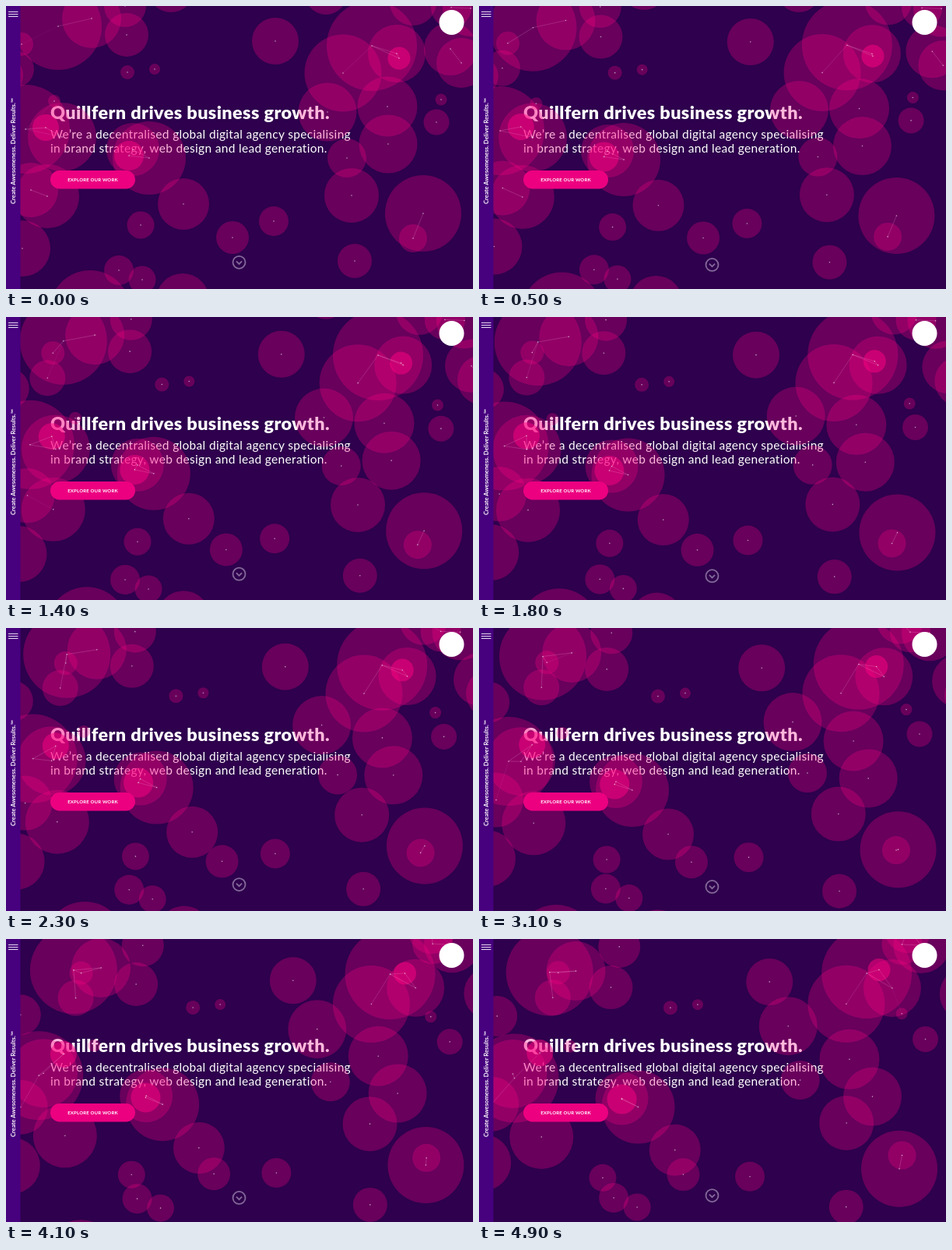
An HTML page for the animation above (5000 ms loop, 600 by 363 pixels).

```html
<!DOCTYPE html>
<html lang="en">
<head>
<meta charset="utf-8">
<title>Landing page</title>
<style>
  html, body { margin: 0; width: 100%; height: 100%; overflow: hidden; background: #2e004d; }
  svg { display: block; width: 600px; height: 363px; font-family: Lato, "Open Sans", sans-serif; fill: #fff; }
  .title { font-size: 23.4px; font-weight: 900; letter-spacing: .4px; }
  .intro { font-size: 15.5px; letter-spacing: .32px; }
  .cta { font-size: 6px; font-weight: 700; letter-spacing: .2px; text-anchor: middle; }
  .motto { font-size: 7.7px; font-weight: 700; }
  #bubbles { fill: #ff0080; }
  #dots { fill-opacity: .6; }
  #lines { stroke: #ffc4e4; stroke-width: .5; }
</style>
</head>
<body>
<svg viewBox="0 0 600 363">
  <rect width="600" height="363" fill="#2e004d"/>
  <text class="title" x="57" y="145">Quillfern drives business growth.</text>
  <text class="intro" x="57" y="169.5">We’re a decentralised global digital agency specialising</text>
  <text class="intro" x="57" y="187.5">in brand strategy, web design and lead generation.</text>
  <g id="arrow" fill="none" stroke="#84689a" stroke-width="1.8">
    <circle r="8"/>
    <path d="M-3.6 -1.4 L0 2.2 L3.6 -1.4"/>
  </g>

  <g id="bubbles"></g>
  <g id="lines"></g>
  <g id="dots"></g>

  <rect x="57" y="211" width="109" height="23.5" rx="11.7" fill="#ec0080"/>
  <text class="cta" x="111.5" y="225">EXPLORE OUR WORK</text>
  <rect width="18.5" height="363" fill="#47007e"/>
  <path d="M3 7.5H15.5M3 10.5H15.5M3 13.5H15.5" stroke="#e8dcf2"/>
  <text class="motto" transform="translate(11.7 254) rotate(-90)">Create Awesomeness. Deliver Results.™</text>
  <circle cx="572.5" cy="21" r="16"/>
</svg>
<script>
const LOOP = 5000, STEP = 100, TRAVEL = 29;
const bubbles = [];
const $ = id => document.getElementById(id);

function set(el, attrs) {
  for (const k in attrs) el.setAttribute(k, attrs[k]);
}
function add(parent, tag, attrs) {
  const el = document.createElementNS("http://www.w3.org/2000/svg", tag);
  set(el, attrs);
  $(parent).append(el);
  return el;
}

const steady = p => p;
const slowing = p => (1 - Math.exp(-1.9 * p)) / (1 - Math.exp(-1.9));

// Sends bubbles [x, y, radius] off together along one heading in degrees
function send(heading, travel, ease, alpha, spots) {
  const a = heading * Math.PI / 180;
  const dx = travel * Math.cos(a), dy = travel * Math.sin(a);
  for (const [x0, y0, r] of spots) {
    const disc = add("bubbles", "circle", { r, "fill-opacity": alpha });
    const dot = add("dots", "circle", { r: .8 });
    bubbles.push({ x0, y0, r, dx, dy, ease, disc, dot });
  }
}
const drift = (heading, ...spots) => send(heading, TRAVEL, steady, .28, spots);
const glow = (heading, ...spots) => send(heading, TRAVEL, steady, .5, spots);
const settle = (heading, travel, ...spots) => send(heading, travel, slowing, .28, spots);

drift(-90, [411, -16, 27], [212, -22, 30]);
drift(-45, [523, 298, 18], [553, 149, 16.5]);
drift(-14, [470, 51, 58], [145, 339, 19], [523, -5, 30], [444, 243, 35], [175, 351, 17.5]);
drift(4, [502, 61, 37]);
drift(20, [153, 0, 27], [53, 244, 41], [346, 45, 30], [-4, 89, 26]);
drift(35, [67, 26, 56], [228, 254, 33], [448, 327, 22]);
drift(45, [25, 158, 57], [184, 195, 47], [163, 184, 34]);
drift(60, [110, 16, 38], [155, 37, 28], [491, 177, 37.5]);
drift(82, [536, 266, 49], [344, 276, 19], [227, 377, 34]);
drift(119, [490, 129, 38.5], [108, 391, 52], [173, 281, 17.5]);
drift(170, [572, 2, 26], [291, 297, 21], [597, 3, 36], [72, 168, 44]);
drift(209, [438, 195, 25]);
drift(237, [413, 136, 37.5], [559, 120, 7.5], [21, 311, 36], [32, 236, 35]);

glow(-72, [505, 67, 14.5]);
glow(-20, [51, 156, 17]);
glow(28, [158, 192, 19]);

settle(-4, 82, [20, 49, 15], [13, 81, 23]);
settle(2, 90, [156, 85, 9], [191, 81, 7]);
settle(16, 57, [62, 122, 8], [571, 55, 34], [585, 73, 32]);
settle(-4, 39, [433, 86, 49.5]);

// Joins two dots while one lies inside the other's disc
function link(a, b) {
  const near = 1 - Math.hypot(a.x - b.x, a.y - b.y) / Math.max(a.r, b.r);
  if (near > 0) add("lines", "line", {
    x1: a.x, y1: a.y, x2: b.x, y2: b.y, "stroke-opacity": Math.min(.4, 1.5 * near)
  });
}

function draw(t) {
  for (const b of bubbles) {
    const p = b.ease(t / LOOP * 1.02);
    b.x = b.x0 + b.dx * p;
    b.y = b.y0 + b.dy * p;
    set(b.disc, { cx: b.x, cy: b.y });
    set(b.dot, { cx: b.x, cy: b.y });
  }
  $("lines").replaceChildren();
  bubbles.forEach((a, i) => bubbles.slice(i + 1).forEach(b => link(a, b)));
  const bob = 330.5 - 1.7 * Math.cos(2 * Math.PI * t / 1200);
  set($("arrow"), { transform: `translate(299.5 ${bob})` });
}

const start = performance.now();
let shown = -1;
function tick() {
  const now = Math.max(0, performance.now() - start) % LOOP;
  const t = Math.floor(now / STEP) * STEP;
  if (t !== shown) draw(shown = t);
  requestAnimationFrame(tick);
}
tick();
</script>
</body>
</html>
```
